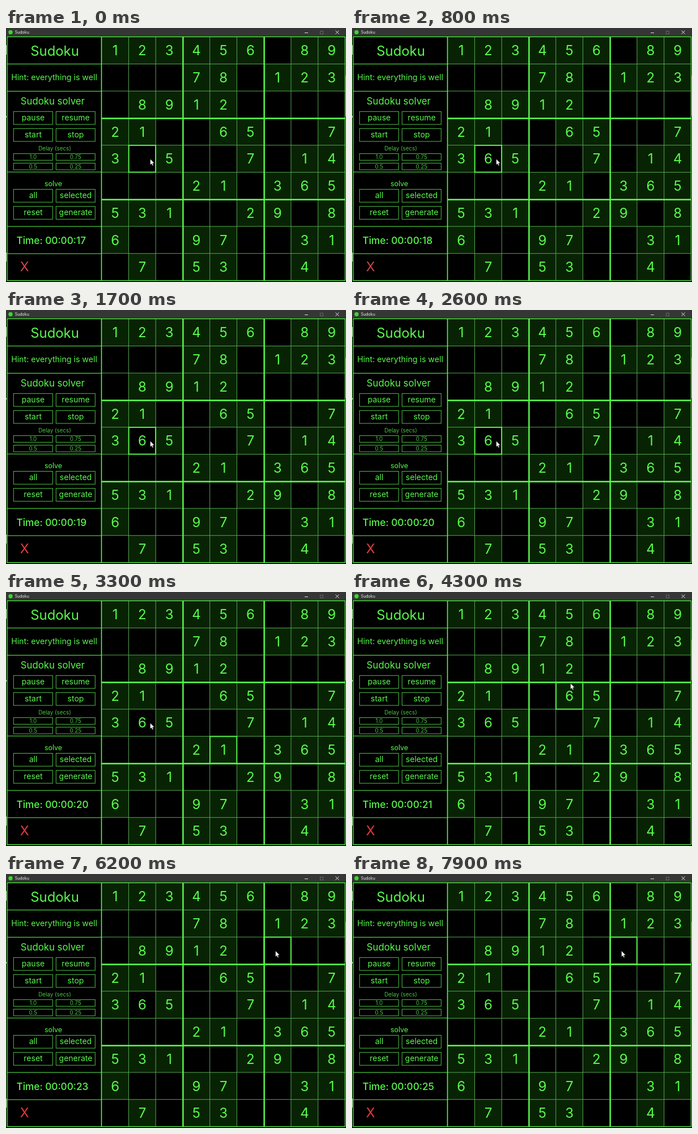
An HTML page with a canvas for the animation above (8000 ms loop, 600 by 448 pixels).

```html
<!DOCTYPE html>
<html lang="en">
<head>
<meta charset="utf-8">
<title>Sudoku</title>
<style>
html, body { margin: 0; width: 100%; height: 100%; overflow: hidden; background: #000; }
canvas { display: block; }
</style>
</head>
<body>
<canvas id="stage" width="600" height="448"></canvas>
<script>
const ctx = document.getElementById('stage').getContext('2d');
const LOOP = 8000;
const BRIGHT = '#58fa4c', LINE = '#55a850', SOFT = '#4cc444', GIVEN = '#082304';
const X0 = 168.5, Y0 = 15.5, CELL = 47.75;
const BOARD = [
  '123456.89', '...78.123', '.8912....',
  '21..65..7', '3.5..7.14', '...21.365',
  '531..29.8', '6..97..31', '.7.53..4.'
];
// Pointer stops: time, x, y
const PATH = [
  [0, 254.5, 231], [3200, 254.5, 231], [3300, 384, 278], [3500, 384, 276],
  [4000, 385.5, 161], [4700, 385.5, 161], [5500, 475.5, 135.5], [LOOP, 475.5, 135.5]
];

function pointer(t) {
  t = Math.max(0, t);
  const i = Math.max(1, PATH.findIndex(p => p[0] > t));
  const [a, b] = [PATH[i - 1], PATH[i]];
  const u = (t - a[0]) / (b[0] - a[0]);
  const k = u * u * (3 - 2 * u);
  return [a[1] + (b[1] - a[1]) * k, a[2] + (b[2] - a[2]) * k];
}

function text(s, x, y, size, color = BRIGHT, weight = 400, align = 'center') {
  ctx.font = `${weight} ${size}px Inter, Roboto, sans-serif`;
  ctx.textAlign = align;
  ctx.fillStyle = color;
  ctx.fillText(s, x, y + size * 0.364);
}

function line(x1, y1, x2, y2, color = LINE, width = 1) {
  ctx.strokeStyle = color;
  ctx.lineWidth = width;
  ctx.beginPath();
  ctx.moveTo(x1, y1);
  ctx.lineTo(x2, y2);
  ctx.stroke();
}

function box(x, y, w, h, color = SOFT, width = 1) {
  ctx.strokeStyle = color;
  ctx.lineWidth = width;
  ctx.strokeRect(x, y, w, h);
}

function button(label, col, y) {
  const x = col ? 88.3 : 13.3;
  box(x, y, 69, 22.7);
  text(label, x + 34.7, y + 10.5, 14);
}

function delayButton(label, col, y) {
  const x = col ? 88.3 : 13.3;
  box(x, y, 69, 11.7);
  text(label, x + 34.5, y + 6, 9.8, SOFT);
}

function titleBar() {
  ctx.fillStyle = '#363636';
  ctx.fillRect(0, 0, 600, 14.5);
  ctx.fillStyle = '#35d92c';
  ctx.beginPath();
  ctx.arc(8, 7.5, 3.7, 0, 7);
  ctx.fill();
  text('Sudoku', 15.7, 7.5, 7, '#f0f0f0', 400, 'left');
  line(527, 8.5, 533, 8.5, '#ddd');
  box(554.5, 5.5, 5, 5, '#666');
  line(581.5, 4.5, 587.5, 10.5, '#eee');
  line(587.5, 4.5, 581.5, 10.5, '#eee');
}

// Slivers of the desktop beside the window
function edges() {
  for (const [y, h] of [[30, 17], [155, 3], [396, 16]]) {
    line(0.5, y, 0.5, y + h, '#bbb');
  }
  line(599.5, 84, 599.5, 155, '#0c7f6c');
}

function panel(t) {
  for (const y of [63.5, 111.5, 254, 350, 398]) line(2, y, 168, y, BRIGHT);
  text('Sudoku', 86, 40, 23.9);
  text('Hint: everything is well', 85, 86.7, 14.2);
  text('Sudoku solver', 82.3, 129, 16.8);
  button('pause', 0, 147.3);
  button('resume', 1, 147.3);
  button('start', 0, 177.3);
  button('stop', 1, 177.3);
  text('Delay (secs)', 86, 212.5, 9.8, SOFT);
  delayButton('1.0', 0, 221.6);
  delayButton('0.75', 1, 221.6);
  delayButton('0.5', 0, 238.4);
  delayButton('0.25', 1, 238.4);
  text('solve', 83.5, 274.8, 12.5);
  button('all', 0, 284.5);
  button('selected', 1, 284.5);
  button('reset', 0, 314.6);
  button('generate', 1, 314.6);
  const secs = 17 + Math.floor((t + 500) / 1000);
  text('Time: 00:00:' + secs, 18.5, 374.5, 17.2, BRIGHT, 500, 'left');
  text('X', 32.7, 421, 23.3, t < 1000 ? '#cf4545' : '#ee3838');
}

function board(t) {
  const digits = [];
  BOARD.forEach((row, r) => [...row].forEach((d, c) => {
    if (d === '.') return;
    ctx.fillStyle = GIVEN;
    ctx.fillRect(X0 + c * CELL, Y0 + r * CELL, CELL, CELL);
    digits.push([d, c, r]);
  }));
  if (t >= 400) digits.push(['6', 1, 4]);
  for (let i = 1; i < 9; i++) {
    const x = X0 + i * CELL + 0.2, y = Y0 + i * CELL + 0.2;
    line(x, Y0, x, 445.5);
    line(X0, y, 598, y);
  }
  for (const i of [3, 6]) {
    const x = X0 + i * CELL + 0.7, y = Y0 + i * CELL + 0.7;
    line(x, Y0, x, 445.5, BRIGHT, 2.4);
    line(X0, y, 598, y, BRIGHT, 2.4);
  }
  for (const [d, c, r] of digits) {
    text(d, X0 + (c + 0.5) * CELL + 0.3, Y0 + (r + 0.5) * CELL + 0.2, 24);
  }
}

function cursor(x, y) {
  ctx.save();
  ctx.translate(x, y);
  ctx.beginPath();
  [[0, 0], [0, 10.5], [2.4, 8.4], [4, 12], [5.7, 11.2], [4.2, 7.7], [7.4, 7.5]]
    .forEach(p => ctx.lineTo(...p));
  ctx.closePath();
  ctx.fillStyle = '#fff';
  ctx.fill();
  ctx.strokeStyle = '#111';
  ctx.lineWidth = 0.6;
  ctx.stroke();
  ctx.restore();
}

function draw(now) {
  const t = Math.floor((now % LOOP) / 100) * 100;
  ctx.fillStyle = '#000';
  ctx.fillRect(0, 0, 600, 448);
  titleBar();
  edges();
  panel(t);
  board(t);
  box(2, 15.5, 596.5, 430, BRIGHT, 1.3);
  line(168.5, 15, 168.5, 446, BRIGHT, 1.6);
  const [px, py] = pointer(t);
  const c = Math.floor((px - X0) / CELL), r = Math.floor((py - Y0) / CELL);
  box(X0 + c * CELL + 0.4, Y0 + r * CELL + 0.4, CELL - 0.3, CELL - 0.3, BRIGHT, 1.9);
  // The drawn arrow trails the highlight by one step
  cursor(...pointer(t - 100));
}

const start = performance.now();
function tick() {
  draw(performance.now() - start);
  requestAnimationFrame(tick);
}
tick();
</script>
</body>
</html>
```
